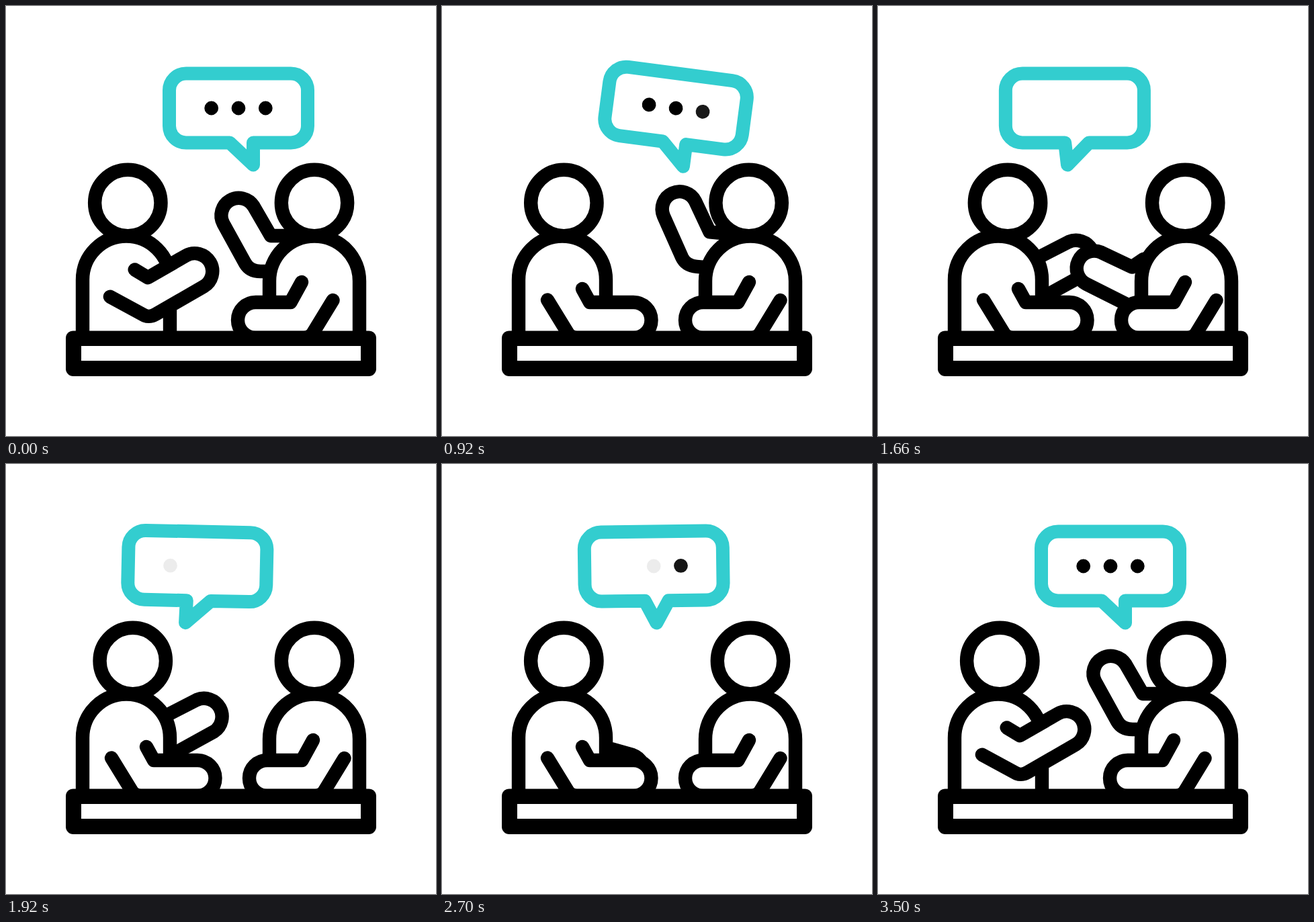
An HTML page that plays this animation: 640x640 px, repeating every 3600 ms.

```html
<!DOCTYPE html>
<html lang="en">
<head>
<meta charset="utf-8">
<title>Conversation</title>
<style>
  html, body { margin: 0; width: 100%; height: 100%; overflow: hidden; background: #fff; }
  svg { display: block; width: 100vw; height: 100vh; }
  .line { fill: #fff; stroke: #000; stroke-width: 20.4; stroke-linecap: round; stroke-linejoin: round; }
  #bubble path { fill: none; stroke: #33cdcf; stroke-width: 20; stroke-linejoin: round; }
</style>
</head>
<body>
<svg viewBox="0 0 640 640">
  <clipPath id="above"><rect width="640" height="500"/></clipPath>

  <g class="line" clip-path="url(#above)">
    <path id="backL" d="M210 389L284 351A27 27 0 0 1 310 398L225 445"/>
    <path id="backR" d="M415 342H394L368.5 298A26 26 0 0 0 323.5 324L356 383Q363 395 379 395H420"/>
    <circle id="headL" cy="293" r="49.2"/>
    <circle id="headR" cy="293" r="49.2"/>
    <path d="M114 510V407.5A65 65 0 0 1 244 407.5V510"/>
    <path d="M392 510V409.5A67 67 0 0 1 526 409.5V510"/>
    <path id="armL" d="M209 421L220 441H285A26.5 26.5 0 0 1 285 494H203Q193 494 188 488L157 437.5"/>
    <path id="armR" d="M457 411L440.5 441H388.5A26.5 26.5 0 0 0 388.5 494H458Q468 494 473 488L503.5 438"/>
  </g>

  <rect x="89" y="483.4" width="462" height="67.6" rx="11"/>
  <rect x="112" y="506" width="416" height="22" fill="#fff"/>

  <g id="bubble">
    <path/>
    <circle cx="-40.3" r="10.4"/>
    <circle r="10.4"/>
    <circle cx="40.3" r="10.4"/>
  </g>
</svg>
<script>
const LOOP = 3600;
const $ = id => document.getElementById(id);
const tail = document.querySelector('#bubble path');
const dots = document.querySelectorAll('#bubble circle');

const ramp = (t, a, b) => Math.min(1, Math.max(0, (t - a) / (b - a)));

function ease(t, a, b) {
  const k = ramp(t, a, b);
  return k * k * (3 - 2 * k);
}

// Rises from a to b, holds, falls from c to d.
const pulse = (t, a, b, c, d) => ease(t, a, b) - ease(t, c, d);

// One sway: down to -1 at b, up to 1 at c, back to 0 at d.
const sway = (t, a, b, c, d) => pulse(t, b, c, c, d) - pulse(t, a, b, b, c);

// Dots leave and return one after another, three times per loop.
function dotAlpha(t, i) {
  const p = t % 1200 - i * 67;
  return 1 - ramp(p, 160, 240) + ramp(p, 715, 795);
}

const move = (id, value) => $(id).setAttribute('transform', value);
const turn = (id, angle, x, y) => move(id, `rotate(${angle} ${x} ${y})`);

function drawPeople(t) {
  $('headL').setAttribute('cx', 181.3 + 12.7 * pulse(t, 900, 1400, 1500, 2450));
  $('headR').setAttribute('cx', 459 - 4.8 * pulse(t, 550, 1300, 1400, 1850));

  turn('armL', -30 * (1 - pulse(t, 0, 600, 2950, 3500)), 147, 439);
  move('armR', `translate(${-17 * (1 - pulse(t, 0, 600, 3080, 3500))})`);

  const wave = t < 1200 ? 5 * Math.sin(Math.PI * t / 600) ** 2 : 0;
  turn('backR', wave - 110 * pulse(t, 1400, 2100, 2950, 3500), 461, 391);
  turn('backL', 85 * (1 - pulse(t, 930, 1390, 2400, 3000)), 179, 391);
}

function drawBubble(t) {
  const s = pulse(t, 1200, 1800, 2400, 3000);
  const tilt = 7.5 * (sway(t, 0, 450, 900, 1350) - sway(t, 1820, 2220, 3120, 3500));
  move('bubble', `translate(${346 - 61.5 * s} 152) rotate(${tilt} 0 16)`);
  tail.setAttribute('d', `M${-13 - 2 * s} 51.5L${22 - 38 * s} 84.5L${22 - s} 51.5H78` +
    'a25 25 0 0 0 25-25v-53a25 25 0 0 0-25-25h-156a25 25 0 0 0-25 25v53a25 25 0 0 0 25 25z');
  dots.forEach((dot, i) => dot.setAttribute('opacity', dotAlpha(t, i)));
}

const start = performance.now();
function tick() {
  const t = (performance.now() - start) % LOOP;
  drawPeople(t);
  drawBubble(t);
  requestAnimationFrame(tick);
}
tick();
</script>
</body>
</html>
```
